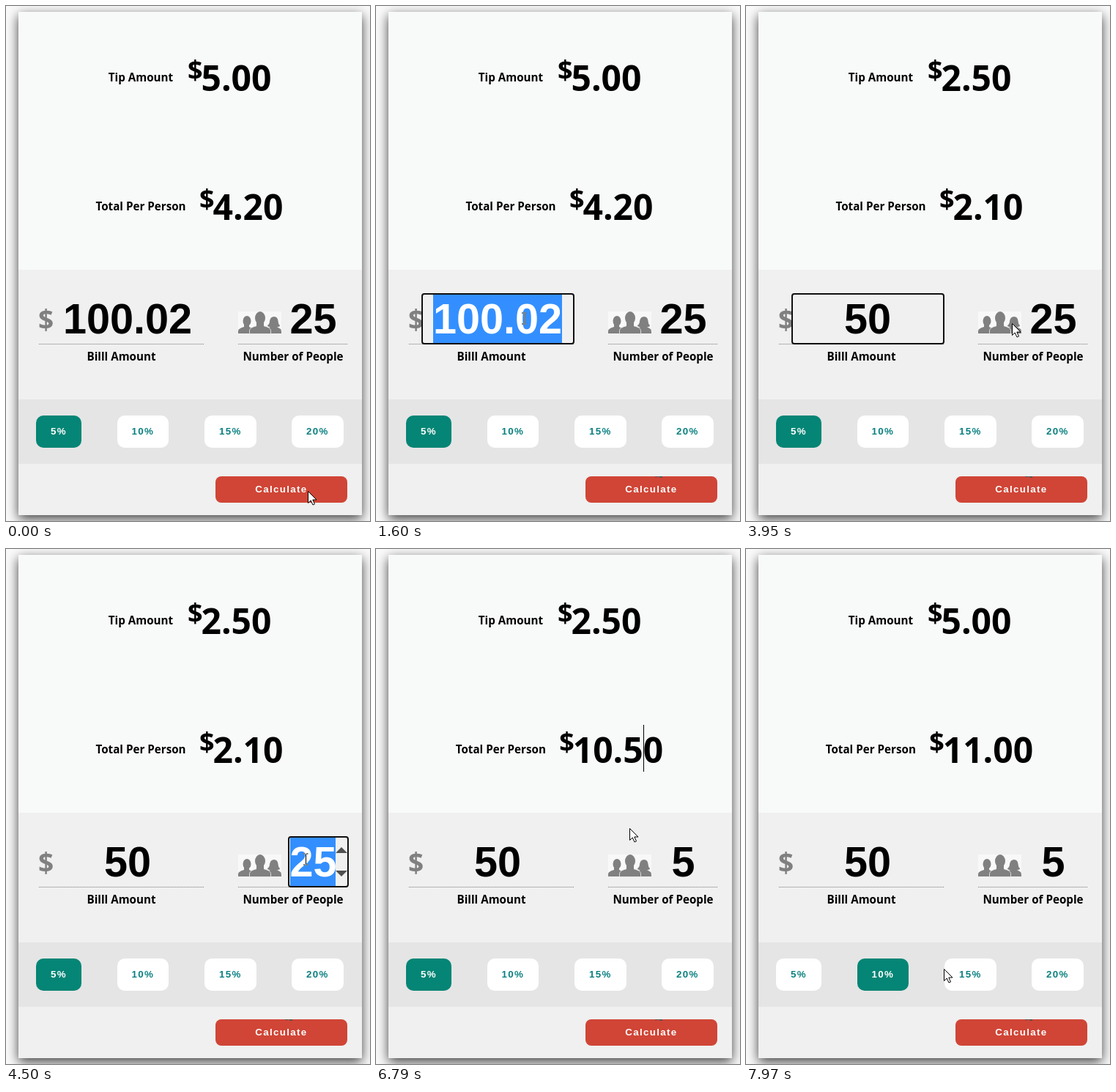
Recreate the animation shown at these times as an HTML page. Size 497x703 px, loop 8 s.

```html
<!DOCTYPE html>
<html lang="en">
<head>
<meta charset="utf-8">
<title>Tip calculator</title>
<style>
html, body { margin: 0; width: 100%; height: 100%; overflow: hidden; background: #fafafa; }
.card { position: absolute; left: 17px; top: 8px; width: 469px; height: 687px; box-shadow: 0 5px 15px rgba(0, 0, 0, .75); }
svg { position: absolute; left: 0; top: 0; width: 497px; height: 703px; }
text { font-family: "Open Sans", "Noto Sans", sans-serif; font-weight: 700; }
.label { font-size: 15.2px; text-anchor: middle; }
.sign { font-size: 36px; }
.value { font-size: 48px; }
.input { font: 700 57.6px "Liberation Sans", Arial, sans-serif; text-anchor: middle; }
.btn text { font: 700 13.33px "Liberation Sans", Arial, sans-serif; letter-spacing: 1.33px; fill: #0b8080; }
.btn rect { fill: #fff; }
.btn.on rect { fill: #048575; }
.btn.on text, .btn.go text { fill: #fff; }
.btn.go rect { fill: #d04536; }
.dots { stroke: #777; stroke-dasharray: 1 1; }
.ring { fill: #f0f0f0; stroke: #101010; stroke-width: 2; }
.mark { fill: #338fff; }
#beam { mix-blend-mode: difference; fill: none; stroke: #fff; }
</style>
</head>
<body>
<div class="card"></div>
<svg viewBox="0 0 497 703">
  <path fill="#f8faf9" d="M17 8h469v352H17z"/>
  <path fill="#f0f0f0" d="M17 360h469v335H17z"/>
  <path fill="#e5e5e5" d="M17 537h469v88H17z"/>

  <text class="label" x="184" y="103">Tip Amount</text>
  <text class="sign" x="248" y="100">$</text>
  <text class="value" id="tip" x="266.5" y="116"></text>
  <g id="totalRow">
    <text class="label" x="184" y="279">Total Per Person</text>
    <text class="sign" x="264" y="276">$</text>
    <text class="value" id="total" x="282.5" y="292"></text>
  </g>
  <path id="textCaret" fill="#000" d="M365 240h1v64h-1z"/>

  <path class="dots" d="M45 461.5H270M317 461.5H467"/>
  <text x="44" y="442" font-size="37" fill="#808080">$</text>
  <path fill="#f8f8f8" d="M317 417h59v30h-59z"/>
  <g fill="#808080">
    <path d="M317 447v-4q1-3 8-5v-3h7v3l4 2v7z"/>
    <ellipse cx="329" cy="430" rx="5.5" ry="7"/>
    <path d="M357 447v-7l4-2q-4 0-4-2 3-2 3-6 1-6 6-6 5 0 5.500 6 0 4 2.500 6 0 2-4 2l5 3q1 1 1 6z"/>
    <path stroke="#f0f0f0" stroke-width=".8" d="M332.500 447.500v-5q1-4 10-6v-4h9v4q9 2 10 6v5z"/>
    <ellipse cx="347" cy="426" rx="7" ry="9"/>
    <path d="M342 430h10v8h-10z"/>
  </g>

  <rect class="ring" id="billRing" x="63" y="393" width="207" height="68" rx="3"/>
  <path class="mark" id="billMark" d="M78 394h176v66H78z"/>
  <text class="input" id="bill" x="166" y="447"></text>
  <g id="peopleRing">
    <rect class="ring" x="386" y="393" width="81" height="68" rx="3"/>
    <path fill="#505050" d="M450 415l8-8 8 8zM450 439l8 8 8-8z"/>
  </g>
  <path class="mark" id="peopleMark" d="M388 394h62v66h-62z"/>
  <text class="input" id="people" x="419.5" y="447"></text>
  <path id="caret" d="M0 395h1v64H0z"/>
  <text class="label" x="157.5" y="484">Billl Amount</text>
  <text class="label" x="392" y="484">Number of People</text>

  <g class="btn" id="p5"><rect x="41" y="559" width="62" height="44" rx="10"/><text x="61" y="585">5%</text></g>
  <g class="btn" id="p10"><rect x="152" y="559" width="70" height="44" rx="10"/><text x="171.500" y="585">10%</text></g>
  <g class="btn"><rect x="271" y="559" width="71" height="44" rx="10"/><text x="291" y="585">15%</text></g>
  <g class="btn"><rect x="390" y="559" width="71" height="44" rx="10"/><text x="410" y="585">20%</text></g>
  <g class="btn go"><rect x="286" y="642" width="180" height="36" rx="8"/><text x="340.300" y="664">Calculate</text></g>
  <path id="speck" fill="#555" d="M381 642h4v1h-4zM386 642h5v2h-3v-1h-2z"/>

  <path id="arrow" fill="#fff" stroke="#000" d="M.5.5v16l3.700-3.500 2.800 6 2.500-1.100-2.700-5.900h5.200z"/>
  <path id="beam" d="M-3 -7.500h2.500M3.500 -7.500H1M.500 -7V7M-3 7.500h2.500M3.500 7.500H1"/>
</svg>
<script>
const LOOP = 8000, STEP = 70;
const el = Object.fromEntries([...document.querySelectorAll('[id]')].map(e => [e.id, e]));

// [time, x, y] of the pointer hot spot
const path = [
  [0, 412, 662], [70, 412, 662], [140, 388, 640], [630, 213, 443], [840, 213, 443],
  [910, 193, 431], [1050, 193, 431], [1120, 204, 437], [1470, 204, 437], [1540, 202, 426],
  [2240, 202, 426], [3010, 183, 415], [3360, 183, 415], [3710, 290, 446], [4060, 411, 425],
  [4480, 409, 423], [5670, 409, 423], [5810, 411, 425], [6020, 411, 425], [6090, 467, 411],
  [6370, 366, 272], [6510, 366, 272], [6790, 346, 381], [6860, 340, 400],
  [7350, 200, 580], [7630, 200, 580], [7980, 270, 573]
];

const during = (t, from, to) => t >= from && t < to;
const show = (e, on) => e.setAttribute('visibility', on ? 'visible' : 'hidden');
const put = (e, x, y) => e.setAttribute('transform', `translate(${x} ${y})`);
const latest = (t, steps) => steps.filter(s => s[0] <= t).pop()[1];
const write = (e, s) => { if (e.textContent !== s) e.textContent = s; };

function pointer(t) {
  const q = Math.floor((t + 10) / STEP) * STEP;
  const i = path.findIndex(p => p[0] > q);
  if (i < 0) return path[path.length - 1].slice(1);
  const [t0, x0, y0] = path[i - 1], [t1, x1, y1] = path[i];
  const k = (q - t0) / (t1 - t0);
  return [Math.round(x0 + (x1 - x0) * k), Math.round(y0 + (y1 - y0) * k)];
}

function draw(t) {
  const bill = latest(t, [[0, '100.02'], [2260, '5'], [2530, '50']]);
  const people = t < 5290 ? '25' : '5';
  const rate = t < 7630 ? .05 : .1;
  const tip = bill * rate;
  write(el.bill, bill);
  write(el.people, people);
  write(el.tip, tip.toFixed(2));
  write(el.total, ((+bill + tip) / people).toFixed(2));
  put(el.totalRow, t < 5290 ? 0 : -13.7, 0);

  const billMarked = during(t, 1130, 2260), peopleMarked = during(t, 4220, 5290);
  show(el.billRing, during(t, 700, 4060));
  show(el.peopleRing, during(t, 4060, 6380));
  show(el.billMark, billMarked);
  show(el.peopleMark, peopleMarked);
  el.bill.setAttribute('fill', billMarked ? '#fff' : '#000');
  el.people.setAttribute('fill', peopleMarked ? '#fff' : '#000');

  show(el.caret, during(t, 2260, 3060) || during(t, 5290, 5820));
  put(el.caret, t < 2530 ? 182 : t < 4000 ? 198 : 435, 0);
  show(el.textCaret, during(t, 6400, 6930));

  el.p5.classList.toggle('on', t < 7630);
  el.p10.classList.toggle('on', t >= 7350);
  show(el.speck, t >= 210);

  const [x, y] = pointer(t);
  const typing = during(t, 2260, 3060) || during(t, 5290, 5690);
  const overInput = y > 392 && y < 462 && (during(x, 62, 271) || during(x, 385, 469));
  const overValue = during(y, 240, 304) && during(x, 268, 393);
  const beam = overInput || overValue;
  put(el.arrow, x, y);
  put(el.beam, x, y + .5);
  show(el.arrow, !beam && !typing);
  show(el.beam, beam && !typing);
}

const start = performance.now();
function tick() {
  draw((performance.now() - start) % LOOP);
  requestAnimationFrame(tick);
}
tick();
</script>
</body>
</html>
```
